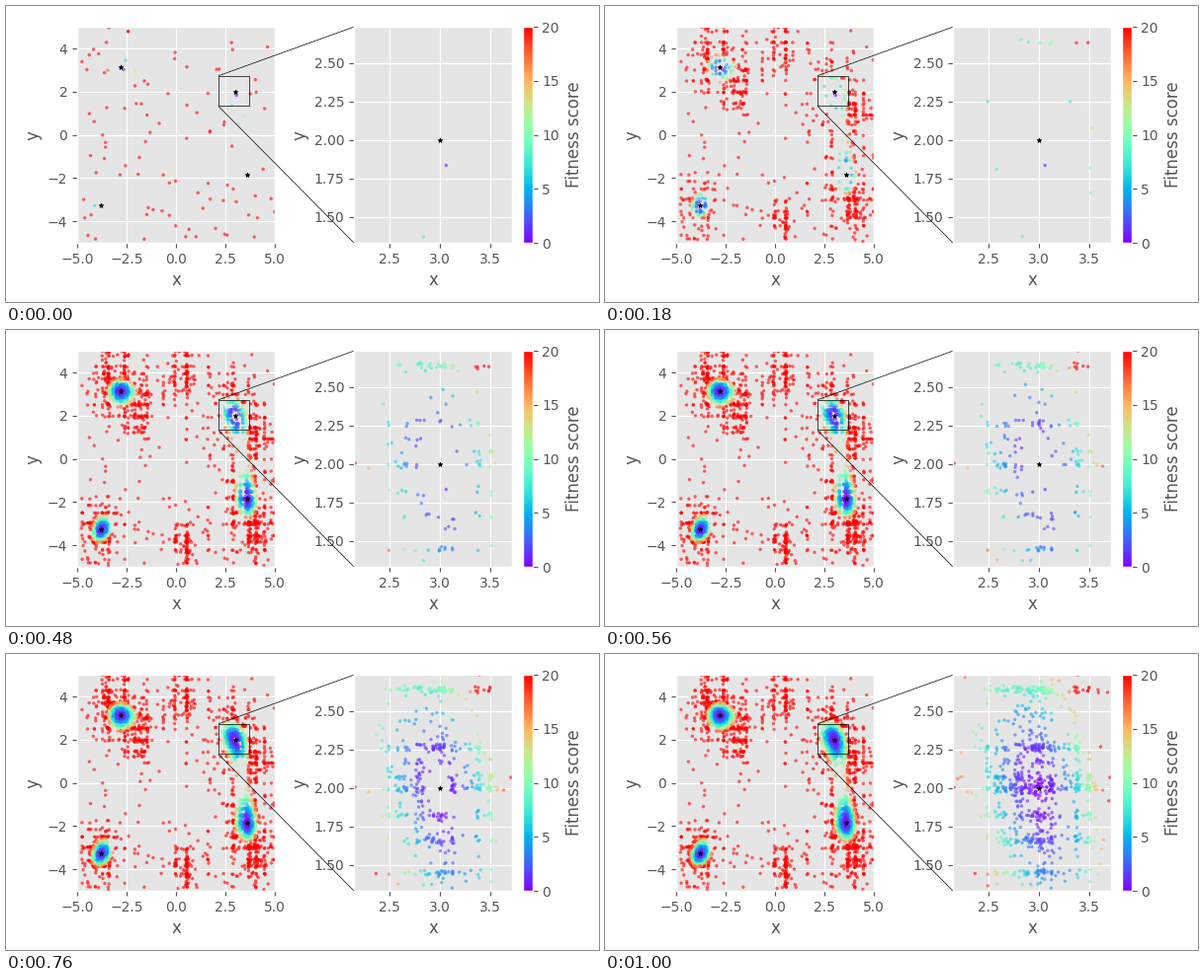
A matplotlib script that plays this animation: 600x300 px, repeating every 1020 ms.

```python
import numpy as np
import matplotlib.pyplot as plt
from matplotlib.animation import FuncAnimation
from matplotlib.cm import ScalarMappable
from matplotlib.colors import Normalize
from mpl_toolkits.axes_grid1.inset_locator import mark_inset

W, H, FRAMES, STEP = 600, 300, 51, 20
XZ, YZ = (2.145, 3.7215), (1.33, 2.735)
NORM = Normalize(0, 20)
rng = np.random.default_rng(11)

# Optimum x, y and the generation in which its search is half way up to speed
NICHES = [(-2.805, 3.131, 10), (-3.779, -3.283, 9),
          (3.584, -1.848, 13), (3.0, 2.0, 26)]
# Centres of other bursts of poor candidates
BURSTS = [(-1.8, 2.2), (-3.2, 4.2), (0.4, 3.9), (3.9, 1.0), (0.5, -3.8), (4.0, -3.4)]


def fitness(x, y):
    return (x**2 + y - 11)**2 + (x + y**2 - 7)**2


def spread(x, y):
    """Basin width per axis, from the curvature of the fitness."""
    return 2.8 / np.sqrt([12 * x**2 + 4 * y - 42, 12 * y**2 + 4 * x - 26])


def snap(p, grid, odds, jitter):
    """Inherit each coordinate from the nearest grid value, with some odds."""
    near = [g[np.argmin(np.abs(g - v))] for g, v in zip(grid, p)]
    return np.where(rng.random(2) < odds, near + rng.normal(0, jitter, 2), p)


def in_zoom(x, y):
    return XZ[0] < x < XZ[1] and YZ[0] < y < YZ[1]


def wanderer(grid):
    while True:
        if rng.random() < 0.5:
            x, y, _ = NICHES[rng.integers(4)]
            size = 2.4 * spread(x, y)
        else:
            x, y = BURSTS[rng.integers(len(BURSTS))]
            size = 0.45, 0.65
        p = snap(rng.normal((x, y), size), grid, 0.65, 0.02)
        if max(abs(p)) < 5 and fitness(*p) > 15 and not in_zoom(*p):
            return p


def settler(g, niche, grid):
    x, y, mid = niche
    worst = 15 + mid + 20 * np.exp(-g / 8)
    best = 10 * np.exp(-2.5 * g / mid)
    while True:
        d = rng.normal(0, spread(x, y))
        d[rng.random(2) < 0.18] *= 0.12
        p = (x, y) + snap(d, grid, 0.95 - 0.011 * g, 0.014)
        if best * (g < 1.5 * mid) < fitness(*p) < worst:
            return p


def evolve():
    pts = list(rng.uniform(-5, 5, (100, 2)))
    grid = np.array(pts[::2]).T
    lattices = [np.c_[[0, 0], rng.normal(0, spread(x, y), (14, 2)).T]
                for x, y, _ in NICHES]
    counts = [len(pts)]
    for g in range(1, FRAMES):
        pts += [wanderer(grid) for _ in range(round(125 * np.exp(-g / 10)))]
        for niche, lattice in zip(NICHES, lattices):
            mid = niche[2]
            n = (20 + 0.8 * mid) / (1 + np.exp(4 * (mid - g) / mid))
            pts += [settler(g, niche, lattice) for _ in range(round(n))]
        counts.append(len(pts))
    return np.array(pts), counts


points, counts = evolve()
scores = fitness(*points.T)

plt.style.use("ggplot")
fig = plt.figure(figsize=(W / 100, H / 100), dpi=100, facecolor="white")


def add_axes(x, w):
    return fig.add_axes([x / W, 60 / H, w / W, 218.8 / H])


def add_plot(x, w, xlim, ylim, xticks, yticks):
    ax = add_axes(x, w)
    dots = ax.scatter(*points.T, s=6, c=scores, cmap="rainbow", norm=NORM,
                      alpha=0.6, linewidths=0)
    best = np.array(NICHES)[:, :2]
    ax.scatter(*best.T, s=11, c="black", marker="*", linewidths=0.6, zorder=3)
    ax.set(xlim=xlim, ylim=ylim, xticks=xticks, yticks=yticks,
           xlabel="x", ylabel="y")
    return ax, dots


main, main_dots = add_plot(72, 200, (-5, 5), (-5, 5),
                           np.arange(-5, 5.1, 2.5), range(-4, 5, 2))
zoom, zoom_dots = add_plot(352, 160, XZ, YZ,
                           [2.5, 3, 3.5], np.arange(1.5, 2.6, 0.25))
mark_inset(main, zoom, loc1=2, loc2=3, fc="none", ec="black", lw=0.5)

bar = fig.colorbar(ScalarMappable(NORM, "rainbow"), cax=add_axes(522.6, 10),
                   ticks=range(0, 21, 5))
bar.set_label("Fitness score")


def update(i):
    n = counts[i]
    for dots in (main_dots, zoom_dots):
        dots.set_offsets(points[:n])
        dots.set_array(scores[:n])
    return main_dots, zoom_dots


anim = FuncAnimation(fig, update, frames=FRAMES, interval=STEP, repeat=True)
plt.show()
```
